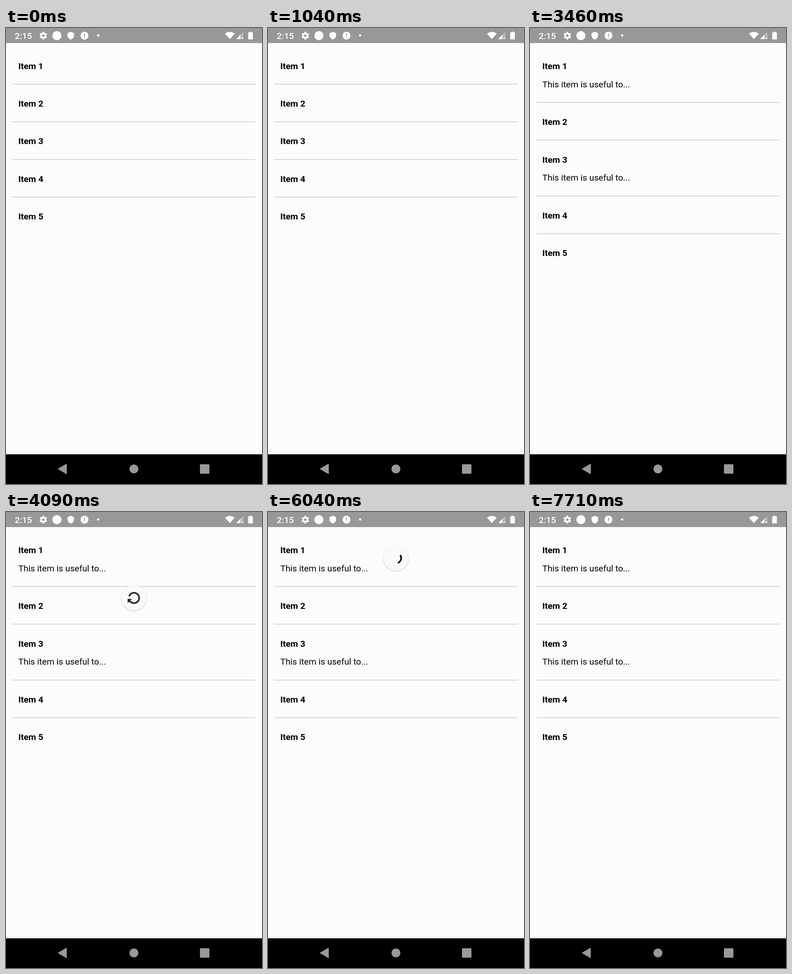
Recreate the animation shown at these times as an HTML page. Size 561 by 998 pixels, loop 8000 ms.

```html
<!DOCTYPE html>
<html lang="en">
<head>
<meta charset="utf-8">
<title>Expandable list with pull to refresh</title>
<style>
  html, body { margin: 0; width: 100%; height: 100%; overflow: hidden; background: #fcfcfd; }
  svg { display: block; width: 561px; height: 998px; font: 19.11px Roboto, sans-serif; }
  .title { font-weight: 700; }
  .clock { font-weight: 500; }
  #disc { filter: drop-shadow(0 1px 1.5px rgba(40, 40, 80, .28)); }
</style>
</head>
<body>
<svg viewBox="0 0 561 998">
  <clipPath id="content"><path d="M0 33H561V933H0z"/></clipPath>
  <rect width="561" height="998" fill="#fcfcfd"/>
  <g id="list"></g>

  <g clip-path="url(#content)">
    <g id="spinner">
      <circle id="disc" r="27.3" fill="#fafafc"/>
      <g id="ring">
        <path id="arc" fill="none" stroke="#000" stroke-width="3.5" stroke-linecap="square"/>
        <path id="arrow"/>
      </g>
    </g>
  </g>

  <rect width="561" height="33" fill="#989898"/>
  <g fill="#fff">
    <text class="clock" x="19.3" y="23.8">2:15</text>
    <g transform="translate(81.8 16.8)">
      <g id="gear"></g>
      <circle r="4.6" fill="none" stroke="#fff" stroke-width="3.4"/>
    </g>
    <circle cx="111.6" cy="16.7" r="10"/>
    <path d="M142 8.2L149.2 11.3V16.2C149.2 20.5 146 24 142 25.3C138 24 134.8 20.5 134.8 16.2V11.3z"/>
    <circle cx="172" cy="16.7" r="8.7"/>
    <path d="M171.1 12h1.8v6h-1.8zM171.1 19.6h1.8v1.9h-1.8z" fill="#989898"/>
    <circle cx="202" cy="16.3" r="2.5"/>
    <path d="M479.8 12.4Q490.5 4.4 501.2 12.4L490.5 24.2z"/>
    <path d="M520 8.8V18H514V24.2H504.6z" opacity=".35"/>
    <path d="M514 14.8V24.2H504.6z"/>
    <path d="M515.6 19.6L520 24M520 19.6L515.6 24" stroke="#fff" stroke-width="1.4"/>
    <path d="M534 8h3.8v1.6h2.2q1 0 1 1V24q0 1-1 1h-8.200q-1 0-1-1V10.600q0-1 1-1H534z"/>
  </g>

  <rect y="933" width="561" height="65"/>
  <g fill="#999">
    <path d="M114 965L132.800 954V976z" stroke="#999" stroke-linejoin="round"/>
    <circle cx="280.300" cy="965" r="9.800"/>
    <rect x="425" y="954.800" width="20.800" height="20.800" rx="2"/>
  </g>
</svg>

<script>
const LOOP = 8000;
const ROW = 82.4, DETAIL = 40.1, DP = 1.365;
const OPEN_AT = { 0: 1550, 2: 2590 };           // row index -> time it expands
const PULL = 3670, PULL_TIME = 480, RELEASE = 4210, SETTLED = 4410;
const FINISH_TIME = 666, CYCLE = 1332;
const HIDE = 7050, HIDE_TIME = 150;
const RADIUS = 11.3;

const $ = id => document.getElementById(id);
const clamp = x => Math.min(1, Math.max(0, x));
const smooth = x => (1 - Math.cos(Math.PI * clamp(x))) / 2;

// cubic-bezier(.4, 0, .2, 1)
function material(x) {
  let lo = 0, hi = 1, s;
  for (let i = 0; i < 20; i++) {
    s = (lo + hi) / 2;
    const bx = 1.2 * s * (1 - s) ** 2 + 0.6 * s * s * (1 - s) + s ** 3;
    if (bx < x) lo = s; else hi = s;
  }
  return s * s * (3 - 2 * s);
}

$('gear').innerHTML = [0, 60, 120].map(a =>
  `<rect x="-2.1" y="-8.5" width="4.2" height="17" rx=".6" transform="rotate(${a})"/>`).join('')
  .replace(/<rect/g, '<rect mask="url(#hub)"') +
  '<mask id="hub"><path d="M-9-9H9V9H-9z" fill="#fff"/><circle r="3" fill="#000"/></mask>';

$('list').innerHTML = [1, 2, 3, 4, 5].map(n => `<g>
  <text class="title" x="27" y="89.700">Item ${n}</text>
  <text class="detail" x="27" y="129.600">This item is useful to...</text>
  ${n < 5 ? '<rect class="line" x="13.600" width="533.800" height="1.370" fill="#c9c9cd"/>' : ''}
</g>`).join('');
const rows = [...$('list').children];

function drawList(t) {
  let y = 0;
  rows.forEach((row, i) => {
    const open = t >= OPEN_AT[i];
    row.setAttribute('transform', `translate(0 ${y})`);
    row.querySelector('.detail').style.display = open ? '' : 'none';
    const line = row.querySelector('.line');
    if (line) line.setAttribute('y', 122.2 + (open ? DETAIL : 0));
    y += ROW + (open ? DETAIL : 0);
  });
}

// Angles are in turns, clockwise from three o'clock.
function ringState(t) {
  const over = 192 * smooth((t - PULL) / PULL_TIME);
  const pull = Math.min(1, over / 64);
  const sling = Math.max(0, over - 64) / 64 / 4;
  const tension = (sling - sling * sling) * 2;
  const ready = Math.max(0, pull - 0.4) / 0.6;
  const turn = (-0.25 + 0.4 * ready + tension * 2) / 2;
  const settle = 1 - (1 - clamp((t - RELEASE) / (SETTLED - RELEASE))) ** 4;
  const y = 101 + 97 * (pull - 1) + 128 * DP * tension * (1 - settle);

  if (t < SETTLED) {
    return { y, start: turn, end: turn + 0.8 * ready, arrow: ready * (1 - settle),
             alpha: 0.3 + 0.7 * clamp((t - 3856) / 300) };
  }
  const u = (t - SETTLED) / FINISH_TIME;
  if (u < 1) {
    const rot = turn + (1 - turn) * u;
    return { y, start: rot + 0.79 * u, end: rot + 0.8, arrow: 0, alpha: 1 };
  }
  const cycles = (t - SETTLED - FINISH_TIME) / CYCLE;
  const n = Math.floor(cycles), v = cycles - n;
  const base = 0.79 + 0.99 * n + 0.21 * v + 0.6 * cycles;
  return v < 0.5
    ? { y, start: base, end: base + 0.79 * material(2 * v) + 0.01, arrow: 0, alpha: 1 }
    : { y, start: base + 0.78 - 0.79 * (1 - material(2 * v - 1)), end: base + 0.79, arrow: 0, alpha: 1 };
}

function drawSpinner(t) {
  const visible = t >= PULL && t < HIDE + HIDE_TIME;
  $('spinner').style.display = visible ? '' : 'none';
  if (!visible) return;
  const { y, start, end, arrow, alpha } = ringState(t);
  const scale = 1 - smooth((t - HIDE) / HIDE_TIME);
  const point = a => `${RADIUS * Math.cos(a * 2 * Math.PI)} ${RADIUS * Math.sin(a * 2 * Math.PI)}`;
  const w = 5 * DP * arrow, h = 5 * DP * arrow;
  $('spinner').setAttribute('transform', `translate(280.5 ${y}) scale(${scale})`);
  $('ring').setAttribute('opacity', alpha);
  $('arc').setAttribute('d', end - start > 0.001
    ? `M${point(start)}A${RADIUS} ${RADIUS} 0 ${+(end - start > 0.5)} 1 ${point(end)}` : '');
  $('arrow').setAttribute('d', arrow > 0 ? `M${RADIUS - w} 1.7h${2 * w}l${-w} ${h}z` : '');
  $('arrow').setAttribute('transform', `rotate(${end * 360})`);
}

const began = performance.now();
function frame() {
  const t = (performance.now() - began) % LOOP;
  drawList(t);
  drawSpinner(t);
  requestAnimationFrame(frame);
}
frame();
</script>
</body>
</html>
```
